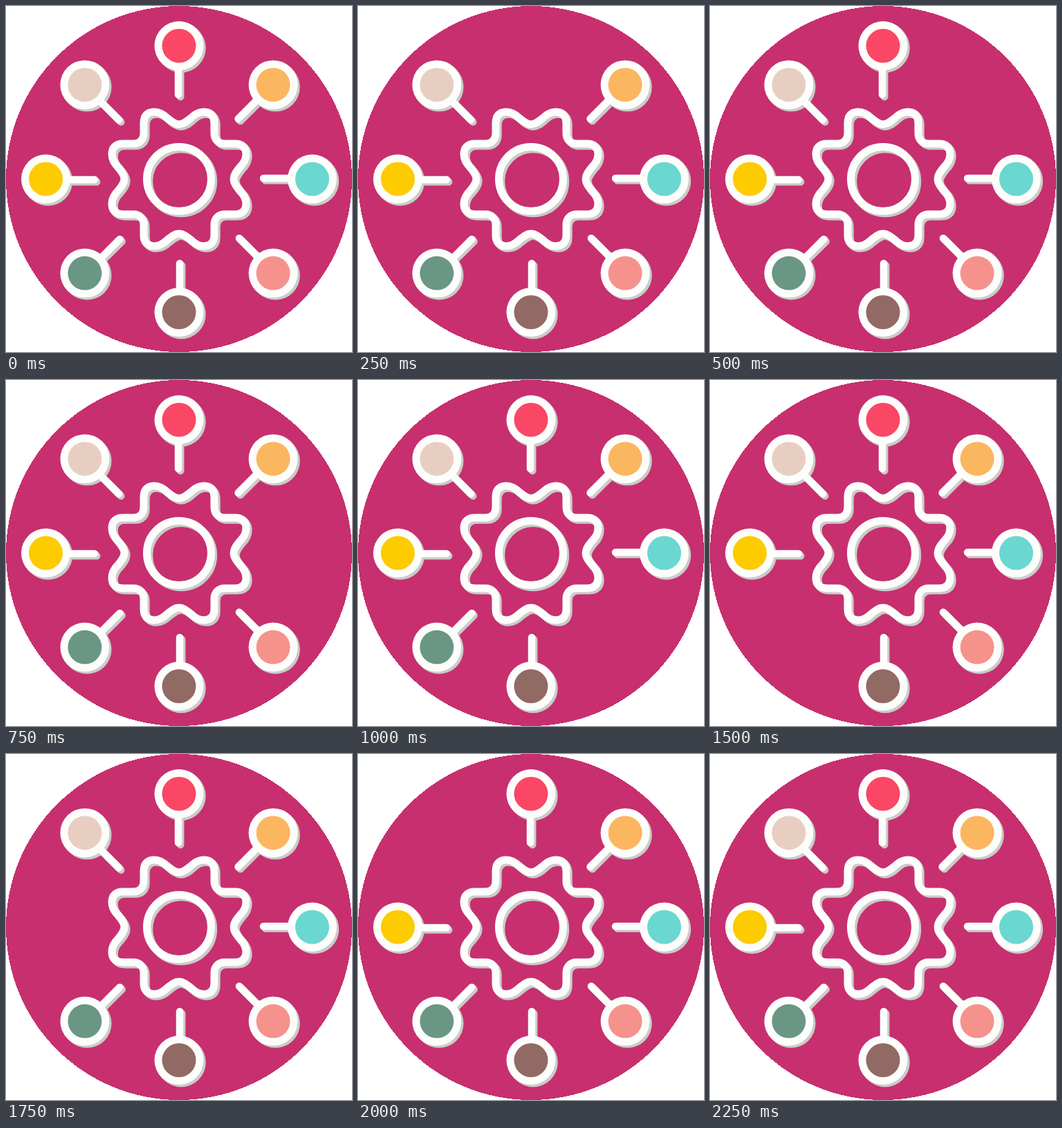
An HTML page that plays this animation: 500 by 500 pixels, repeating every 2.5 s.

```html
<!DOCTYPE html>
<html lang="en">
<head>
<meta charset="utf-8">
<title>Gear and satellites</title>
<style>
html, body { margin: 0; width: 100%; height: 100%; overflow: hidden; background: #fff; }
svg { display: block; width: 100vw; height: 100vh; }
</style>
</head>
<body>
<svg id="stage" viewBox="-250 -250 500 500"></svg>
<script>
const WHITE = '#fdfefb', SHADE = '#c9ccc8', DISC = '#c82f6f';
const COLORS = ['#fa4766', '#fbb75f', '#6ad7d1', '#f6928c',
                '#926a64', '#6a9685', '#fccb00', '#e8cec0'];
const STEP = 250, LOOP = 2500, DEPTH = 3.2;
const stage = document.getElementById('stage');

function add(parent, tag, attrs) {
  const el = document.createElementNS('http://www.w3.org/2000/svg', tag);
  for (const key in attrs) el.setAttribute(key, attrs[key]);
  parent.appendChild(el);
  return el;
}

// Draws a shape in white above its diagonal extrusion.
function raised(parent, draw) {
  for (let i = 4; i >= 0; i--) {
    const d = DEPTH * i / 4;
    const color = i ? SHADE : WHITE;
    draw(add(parent, 'g', {
      transform: `translate(${d} ${d})`, fill: color, stroke: color,
      'stroke-linecap': 'round', 'stroke-linejoin': 'round'
    }));
  }
}

// One quarter of the outline runs from a valley to the next; turn it four times.
function gearPath() {
  const half = [[0, -79], [6, -79], [11, -83], [17, -88], [22, -93], [28, -97], [36, -97],
                [46, -97], [51, -91], [51, -81], [51, -76], [51, -71], [51, -66]];
  const mirror = half.map(([x, y]) => [-y, -x]).reverse();
  const quarter = [...half.slice(1), [51, -57], [57, -51], ...mirror];
  let path = 'M0 -79';
  for (let turn = 0; turn < 4; turn++) {
    const pts = quarter.map(([x, y]) => {
      for (let i = 0; i < turn; i++) [x, y] = [-y, x];
      return `${x} ${y}`;
    });
    path += 'C' + pts.join(' ');
  }
  return path + 'Z';
}

function makeNode(color, i) {
  const node = add(stage, 'g', {});
  const a = i * Math.PI / 4;
  const cx = 192.5 * Math.sin(a), cy = -192.5 * Math.cos(a);
  raised(node, g => {
    add(g, 'path', { d: 'M-1 -122V-170', 'stroke-width': 10.5, transform: `rotate(${i * 45})` });
    add(g, 'circle', { cx, cy, r: 35.5, stroke: 'none' });
  });
  add(node, 'circle', { cx, cy, r: 24.5, fill: color });
  return node;
}

add(stage, 'circle', { r: 250, fill: DISC, 'shape-rendering': 'crispEdges' });
const outline = gearPath();
raised(stage, g => {
  add(g, 'path', { d: outline, fill: 'none', 'stroke-width': 11 });
  add(g, 'circle', { r: 46.5, fill: 'none', 'stroke-width': 11 });
});
const nodes = COLORS.map(makeNode);

// Each node blinks off for one step in clockwise order.
function render(time) {
  const hidden = Math.floor(time % LOOP / STEP) - 1;
  nodes.forEach((node, i) => {
    node.setAttribute('visibility', i === hidden ? 'hidden' : 'visible');
  });
}

let start = null;
function tick(now) {
  if (start === null) start = now;
  render(now - start);
  requestAnimationFrame(tick);
}
render(0);
requestAnimationFrame(tick);
</script>
</body>
</html>
```
